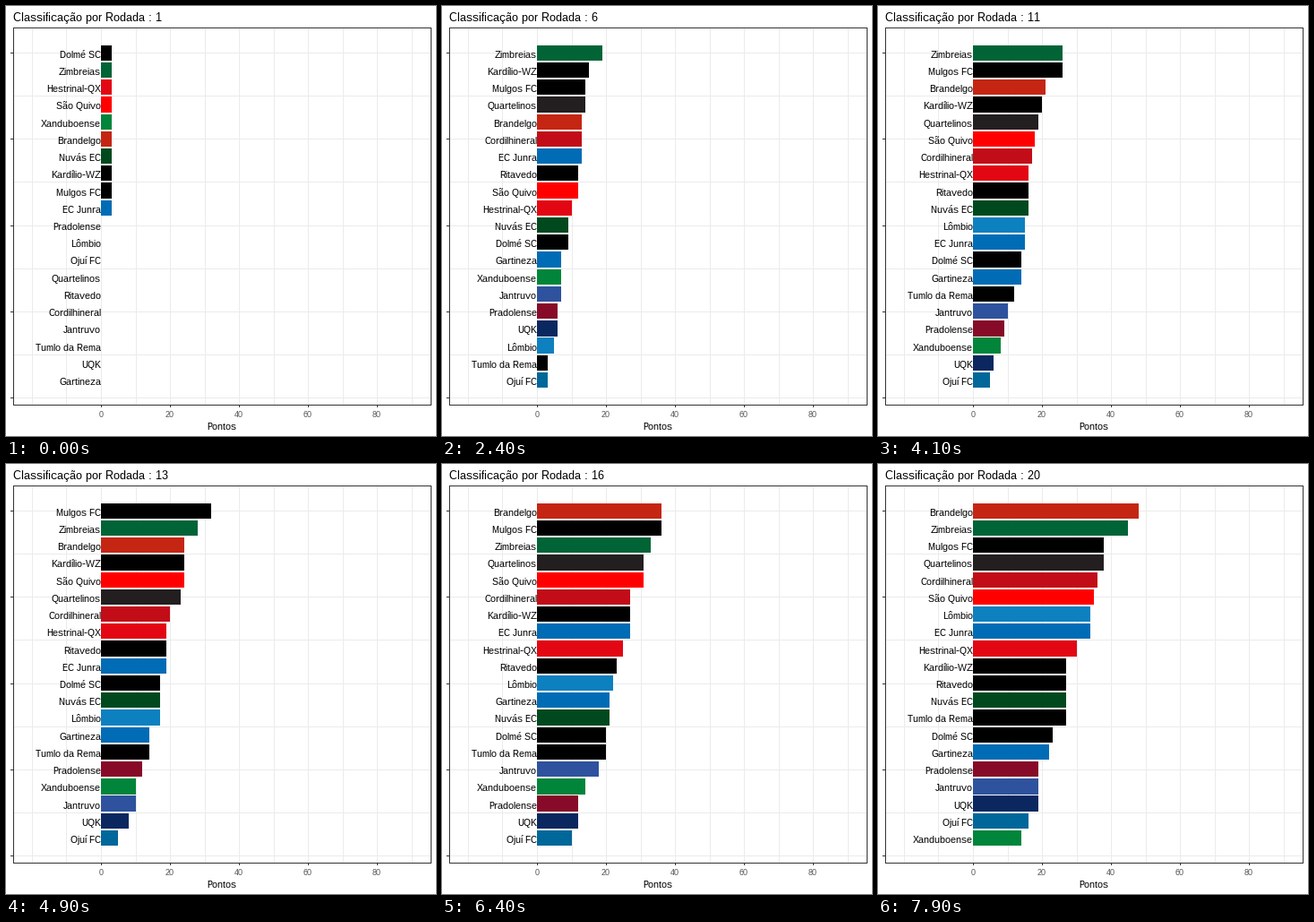
These frames come from a looping animation (480 by 480 pixels, 8000 ms). A matplotlib script:

```python
import matplotlib.pyplot as plt
from matplotlib.animation import FuncAnimation
from matplotlib.patches import Rectangle

plt.rcParams.update({
    "font.family": "Liberation Sans",
    "text.hinting": "native",
    "text.hinting_factor": 1,
})

SIZE = 480
FRAMES, INTERVAL = 80, 100
ROUNDS = 21
X0, PX_PER_POINT = 105.99, 3.855
Y0, ROW = 52.77, 19.225

# key: name, bar colour, result of each round (W win, D draw, L loss)
TEAMS = {
    "D": ("Dolmé SC", "#000000", "WLLLWWLDLDWLWWLLLDDLD"),
    "Z": ("Zimbreias", "#006437", "WDWWWWWWWDLDDDDWLWWWW"),
    "H": ("Hestrinal-QX", "#E30613", "WLDWLLWLLWWWLLWLWDLDW"),
    "S": ("São Quivo", "#FF0000", "WWDWDLDDDDWWWWWLDLDWL"),
    "X": ("Xanduboense", "#00853A", "WLDLLWLLDLLDDLWDLLLLL"),
    "B": ("Brandelgo", "#C52613", "WLDWLWWDWWDWLWWWWWWWW"),
    "N": ("Nuvás EC", "#00491E", "WLLWWLLWWLDDLLDWLLLWW"),
    "K": ("Kardílio-WZ", "#000000", "WWWLWLWLDWDDWWLLLLLLL"),
    "M": ("Mulgos FC", "#000000", "WWDWLDWWWWWWWLLDWDLLD"),
    "E": ("EC Junra", "#006CB5", "WLWLDWWDLLDDWDDWWWDLW"),
    "P": ("Pradolense", "#870A28", "LLWLWLLDDDLLWLLLLWWLD"),
    "L": ("Lômbio", "#0D80BF", "LDLDLWLWWWDDDLDWDWWWW"),
    "O": ("Ojuí FC", "#00679A", "LDLDDLLDLLDLLDLDWLWWL"),
    "Q": ("Quartelinos", "#231F20", "LWDDWWWDLWDWDDWDWDLWW"),
    "R": ("Ritavedo", "#000000", "LWWWLLWWLDLLWWLDLWDLL"),
    "C": ("Cordilhineral", "#C20D18", "LWLWWDWLWLDWLDWLWWWWL"),
    "J": ("Jantruvo", "#2F529E", "LWWLLLDDLDDLLDWDWLLLD"),
    "T": ("Tumlo da Rema", "#000000", "LLDLDDLWWLWDDWLWLLWDW"),
    "U": ("UQK", "#0A285F", "LDDDLWLLLLLDDLWDLWDWL"),
    "G": ("Gartineza", "#006CB5", "LWLLWDLLWWDLLWLDWLDLL"),
}

# Order among teams level on points and wins, valid around each round.
TIE_ORDER = {
    2: "DZHSXBNKMEPLOQRCJTUG",
    5: "ZKSMCNRQHBEDPGJXOULT",
    9: "ZMBCKNRQESLDHGTPXJUO",
    11: "ZMBKQSCHRNLEDGPTJXUO",
    15: "MBZSKQCHREDNLGTXJPUO",
    17: "BMZQSCKEHRLGNDTJXPUO",
    21: "BZMQCSLEHKRNTDGPJUOX",
}


def standings(n):
    """Teams after n rounds as (name, colour, points), leader first."""
    nearest = min(TIE_ORDER, key=lambda r: (abs(r - n), -r))
    rows = []
    for key, (name, colour, form) in TEAMS.items():
        wins, draws = form[:n].count("W"), form[:n].count("D")
        points = 3 * wins + draws
        rank = (-points, -wins, TIE_ORDER[nearest].index(key))
        rows.append((rank, name, colour, points))
    return [row[1:] for row in sorted(rows)]


TABLES = {n: standings(n) for n in range(1, ROUNDS + 1)}

fig = plt.figure(figsize=(SIZE / 72, SIZE / 72), dpi=72, facecolor="white")
ax = fig.add_axes([0, 0, 1, 1])
ax.set_xlim(0, SIZE)
ax.set_ylim(SIZE, 0)
ax.axis("off")


def x_at(points):
    return round(X0 + points * PX_PER_POINT)


def box(x, y, w, h, colour, z=1):
    patch = Rectangle((x, y), w, h, facecolor=colour, linewidth=0,
                      antialiased=False, zorder=z)
    return ax.add_patch(patch)


def write(x, y, text, size, colour="black", ha="left"):
    return ax.text(x, y, text, fontsize=size, color=colour, ha=ha,
                   va="baseline", zorder=4)


def draw_panel():
    left, top, right, bottom = 8, 24, 474, 445
    grid, border = "#EBEBEB", "#333333"
    for value in range(-20, 91, 10):
        x = x_at(value)
        box(x, top, 1, bottom - top, grid)
        if value >= 0 and value % 20 == 0:
            box(x, bottom, 1, 3, border)
            write(x, 459, str(value), 9, "#4D4D4D", "center")
    for i in range(9):
        y = int(Y0 + 2.5 * i * ROW)
        box(left, y, right - left, 1, grid)
        if i % 2 == 0:
            box(left - 3, y, 3, 1, border)
    for y in (top, bottom):
        box(left, y, right - left + 1, 1, border, 3)
    for x in (left, right):
        box(x, top, 1, bottom - top + 1, border, 3)
    write(241, 473, "Pontos", 11, ha="center")


draw_panel()
title = write(8, 17, "", 13)
bars, labels = [], []
for i in range(len(TEAMS)):
    centre = Y0 + i * ROW
    y, y_end = int(centre - 0.45 * ROW), int(centre + 0.45 * ROW)
    bars.append(box(x_at(0), y, 0, y_end - y, "black", 2))
    labels.append(write(x_at(0), int(centre + 5.5), "", 11, ha="right"))


def update(k):
    # The bars move on one step before the title, except at the very end.
    table_round = ROUNDS if k == FRAMES - 1 else 1 + k // 4
    title_round = 20 if k >= 76 else 1 + max(k - 1, 0) // 4
    title.set_text(f"Classificação por Rodada : {title_round}")
    for bar, label, row in zip(bars, labels, TABLES[table_round]):
        name, colour, points = row
        bar.set_width(x_at(points) - x_at(0))
        bar.set_facecolor(colour)
        bar.set_visible(points > 0)
        label.set_text(name)
    return [title, *bars, *labels]


anim = FuncAnimation(fig, update, frames=FRAMES, interval=INTERVAL,
                     repeat=True, repeat_delay=0, blit=False)
plt.show()
```
